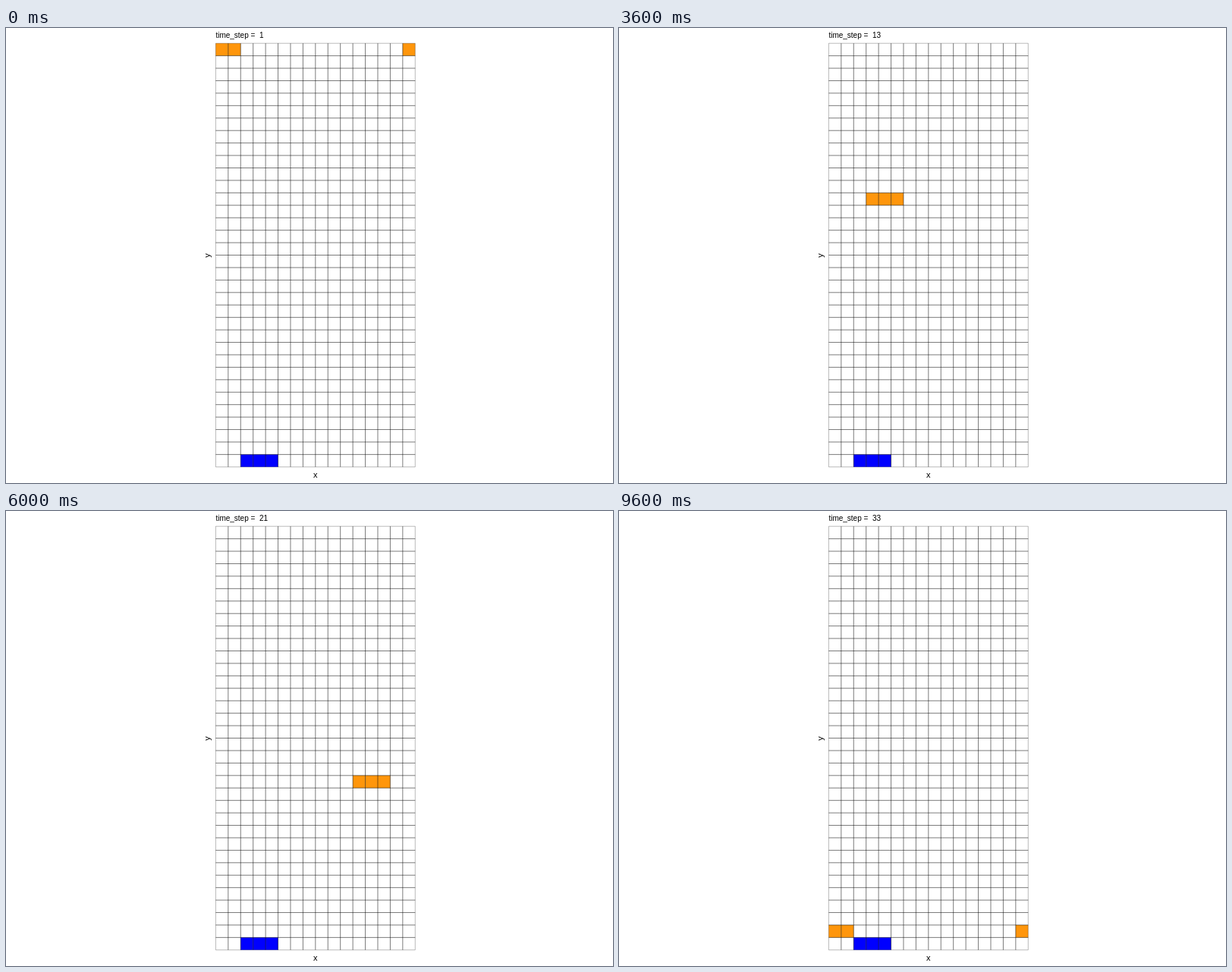
Recreate the animation shown at these times as an HTML page. Size 800 by 600 pixels, loop 9900 ms.

```html
<!DOCTYPE html>
<html lang="en">
<head>
<meta charset="utf-8">
<title>Moving tiles on a grid</title>
<style>
  html, body { margin: 0; width: 100%; height: 100%; overflow: hidden; background: #fff; }
  svg { display: block; width: 800px; height: 600px; }
  text { font-family: "Liberation Sans", Arial, sans-serif; fill: #000; white-space: pre; }
  .inner, .edge { fill: none; stroke: #000; stroke-width: .52; }
  .edge { stroke-width: .28; }
</style>
</head>
<body>
<svg viewBox="0 0 800 600">
  <text id="title" x="276.4" y="13" font-size="10"></text>
  <g id="player" fill="#00f"></g>
  <g id="mover" fill="#ff960c"></g>
  <path id="lines" class="inner"/>
  <path id="frame" class="edge"/>
  <text x="407.8" y="593" font-size="11" text-anchor="middle">x</text>
  <text transform="translate(268.6 300) rotate(-90)" font-size="11" text-anchor="middle">y</text>
</svg>
<script>
  const COLS = 16, ROWS = 34, STEPS = 33, STEP_MS = 300;
  const LEFT = 276.4, TOP = 20.2, CELL = 16.43;
  const WIDTH = COLS * CELL, HEIGHT = ROWS * CELL;
  const byId = id => document.getElementById(id);

  function addCells(group) {
    return [0, 1, 2].map(() => {
      const rect = document.createElementNS("http://www.w3.org/2000/svg", "rect");
      rect.setAttribute("width", CELL);
      rect.setAttribute("height", CELL);
      return group.appendChild(rect);
    });
  }

  // Three neighbouring cells around a centre column, wrapping at the sides.
  function place(cells, centre, row) {
    cells.forEach((cell, i) => {
      const col = (centre + i - 1 + COLS) % COLS;
      cell.setAttribute("x", LEFT + col * CELL);
      cell.setAttribute("y", TOP + row * CELL);
    });
  }

  function drawGrid() {
    let d = "";
    for (let c = 1; c < COLS; c++) d += `M${LEFT + c * CELL} ${TOP}v${HEIGHT}`;
    for (let r = 1; r < ROWS; r++) d += `M${LEFT} ${TOP + r * CELL}h${WIDTH}`;
    byId("lines").setAttribute("d", d);
    byId("frame").setAttribute("d", `M${LEFT} ${TOP}h${WIDTH}v${HEIGHT}h${-WIDTH}z`);
  }

  const mover = addCells(byId("mover"));
  let shown = -1;

  function show(step) {
    if (step === shown) return;
    shown = step;
    place(mover, (COLS - step % COLS) % COLS, step);
    byId("title").textContent = `time_step =  ${step + 1}`;
  }

  function tick(now) {
    show(Math.floor((now - start) / STEP_MS) % STEPS);
    requestAnimationFrame(() => tick(performance.now()));
  }

  drawGrid();
  place(addCells(byId("player")), 3, ROWS - 1);
  const start = performance.now();
  tick(start);
</script>
</body>
</html>
```
